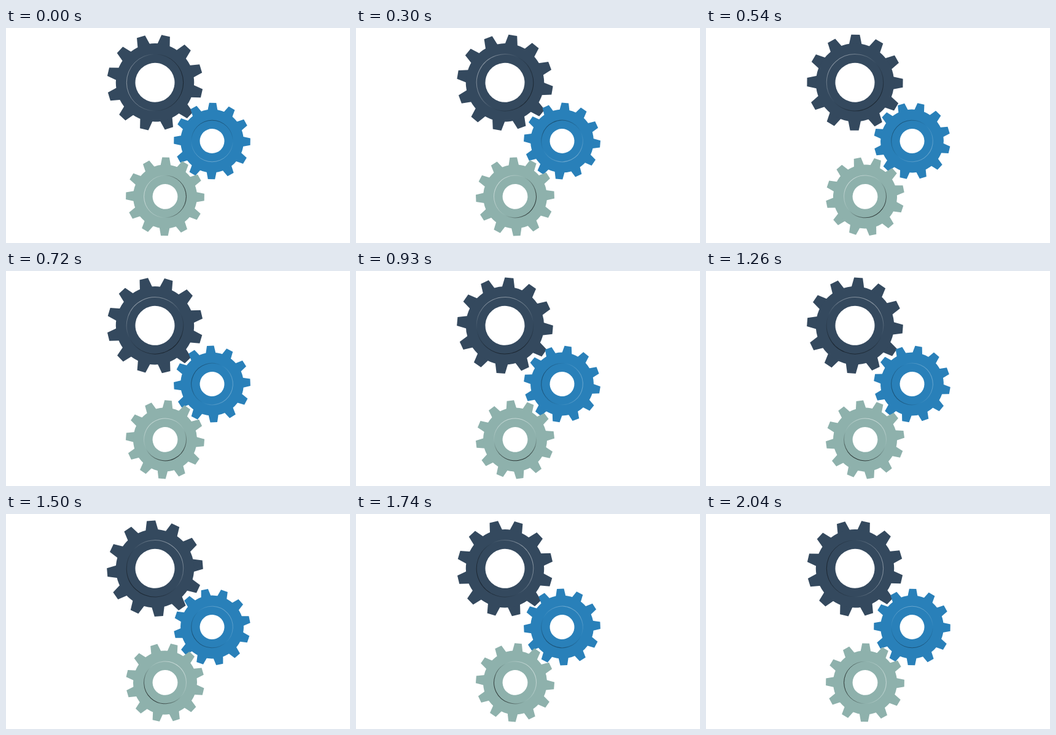
Write an HTML page that moves like this. It is 560 px wide and 350 px high and loops after 2.07 s.

```html
<!DOCTYPE html>
<html lang="en">
<head>
<meta charset="utf-8">
<title>Gears</title>
<style>
  html, body { margin: 0; width: 100%; height: 100%; overflow: hidden; background: #fff; }
  svg { display: block; width: 560px; height: 350px; }
</style>
</head>
<body>
<svg id="stage" viewBox="0 0 560 350"></svg>
<script>
const LOOP = 2070, STEP = 30, LAST = LOOP / STEP - 1, TEETH = 12;

// tip, body, hole and ring are radii; top and base are half widths of a tooth
const gears = [
  { x: 242.5, y: 88.8, tip: 78, body: 63.7, hole: 32, ring: 46.2, top: 7, base: 10.2,
    color: '#34495e', start: 13, shade: 0, dir: 1, light: 0.42, dark: 0.5 },
  { x: 335.5, y: 184, tip: 62.2, body: 51.4, hole: 20, ring: 33.8, top: 5.7, base: 8,
    color: '#2980b9', start: 1, shade: -90, dir: -1, light: 0.3, dark: 0.36 },
  { x: 259, y: 274.4, tip: 63.8, body: 52, hole: 20.4, ring: 34.4, top: 5.8, base: 8.2,
    color: '#8eb1ac', start: 1, shade: 0, dir: 1, light: 0.5, dark: 0.7 }
];

const circle = r => `M${-r} 0a${r} ${r} 0 1 0 ${2 * r} 0a${r} ${r} 0 1 0 ${-2 * r} 0z`;

function drawGear(g, i) {
  const root = g.body - 3, foot = g.base + 0.4;
  const tooth = `M${-foot} ${-root}L${-g.top} ${-g.tip}H${g.top}L${foot} ${-root}z`;
  const teeth = Array.from({ length: TEETH }, (_, k) =>
    `<path d="${tooth}" transform="rotate(${k * 360 / TEETH})"/>`).join('');
  return `<g transform="translate(${g.x} ${g.y})">
    <linearGradient id="bevel${i}">
      <stop offset="0" stop-color="#fff" stop-opacity="${g.light}"/>
      <stop offset=".5" stop-color="#fff" stop-opacity="0"/>
      <stop offset=".5" stop-color="#000" stop-opacity="0"/>
      <stop offset="1" stop-color="#000" stop-opacity="${g.dark}"/>
    </linearGradient>
    <g class="wheel" fill="${g.color}">${teeth}
      <path d="${circle(g.body)}${circle(g.hole)}" fill-rule="evenodd"/>
    </g>
    <circle class="ring" r="${g.ring}" fill="none" stroke="url(#bevel${i})"/>
  </g>`;
}

const stage = document.getElementById('stage');
stage.innerHTML = gears.map(drawGear).join('');
const wheels = stage.querySelectorAll('.wheel');
const rings = stage.querySelectorAll('.ring');

// Half a turn per loop, in even steps
function render() {
  const turn = 180 * Math.floor(performance.now() % LOOP / STEP) / LAST;
  gears.forEach((g, i) => {
    wheels[i].setAttribute('transform', `rotate(${g.start + g.dir * turn})`);
    rings[i].setAttribute('transform', `rotate(${g.shade + g.dir * turn})`);
  });
  requestAnimationFrame(render);
}
render();
</script>
</body>
</html>
```
